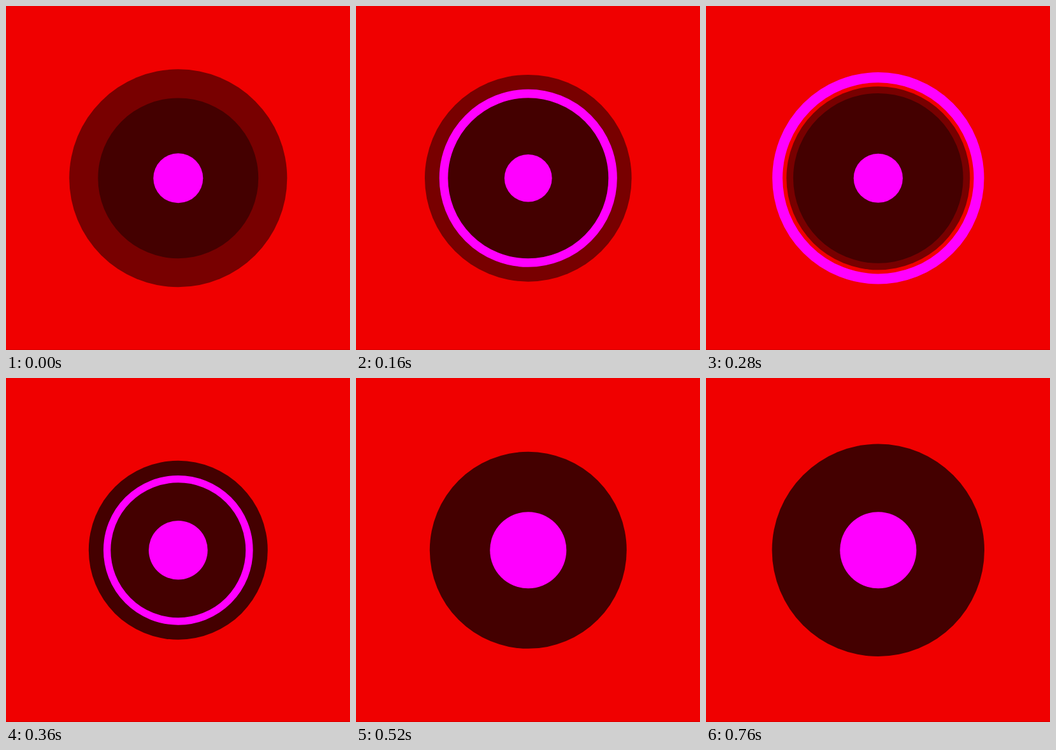
Recreate the animation shown at these times as an HTML page. Size 540 by 540 pixels, loop 0.96 s.

```html
<!DOCTYPE html>
<html lang="en">
<head>
<meta charset="utf-8">
<title>Pulse</title>
<style>
  html, body { margin: 0; width: 100%; height: 100%; overflow: hidden; background: #f00000; }
  svg { display: block; width: 100vw; height: 100vh; }
</style>
</head>
<body>
<svg viewBox="0 0 540 540">
  <rect width="540" height="540" fill="#f00000"/>
  <rect y="539" width="540" height="1" fill="#d80000"/>
  <g transform="translate(270.3 270.3)">
    <circle id="halo" fill="#780000"/>
    <circle id="disc" fill="#440000"/>
    <circle id="ring" fill="none" stroke="#ff00ff"/>
    <circle id="dot" fill="#ff00ff"/>
  </g>
</svg>
<script>
const LOOP = 960, STEP = 40, LAST = 760;
const [halo, disc, ring, dot] = ['halo', 'disc', 'ring', 'dot'].map(id => document.getElementById(id));

// Smooth ease from a to b between times t0 and t1
function ease(t, t0, t1, a, b) {
  const x = Math.min(1, Math.max(0, (t - t0) / (t1 - t0)));
  return a + (b - a) * x * x * (3 - 2 * x);
}

// Hermite curve through [time, value] knots, flat at both ends
function curve(t, knots) {
  const n = knots.length - 1;
  if (t <= knots[0][0]) return knots[0][1];
  if (t >= knots[n][0]) return knots[n][1];
  const slope = i => i === 0 || i === n ? 0
    : (knots[i + 1][1] - knots[i - 1][1]) / (knots[i + 1][0] - knots[i - 1][0]);
  const i = knots.findIndex(k => k[0] > t) - 1;
  const [t0, a] = knots[i], [t1, b] = knots[i + 1];
  const d = t1 - t0, x = (t - t0) / d, y = 1 - x;
  return a * y * y * (1 + 2 * x) + b * x * x * (3 - 2 * x)
    + d * x * y * (slope(i) * y - slope(i + 1) * x);
}

const discKnots = [[120, 125.9], [200, 127.3], [280, 133.4], [440, 147.6], [600, 160.5], [760, 166.7]];

function draw(t) {
  halo.setAttribute('r', ease(t, 40, 480, 171, 123.5));
  disc.setAttribute('r', curve(t, discKnots));
  dot.setAttribute('r', t < 240 ? ease(t, 0, 80, 39, 37.3) : ease(t, 240, 520, 37.3, 60));

  // The ring scales as a whole, so its line grows with it
  const outer = t < 240 ? ease(t, 0, 240, 39, 174.7) : ease(t, 240, 480, 174.7, 60);
  const line = outer * 0.097;
  ring.setAttribute('r', outer - line / 2);
  ring.setAttribute('stroke-width', line);
  ring.setAttribute('visibility', t > 0 && t < 520 ? 'visible' : 'hidden');
}

const start = performance.now();
function tick() {
  const t = (performance.now() - start) % LOOP;
  draw(Math.min(LAST, Math.floor(t / STEP) * STEP));
  requestAnimationFrame(tick);
}
tick();
</script>
</body>
</html>
```
